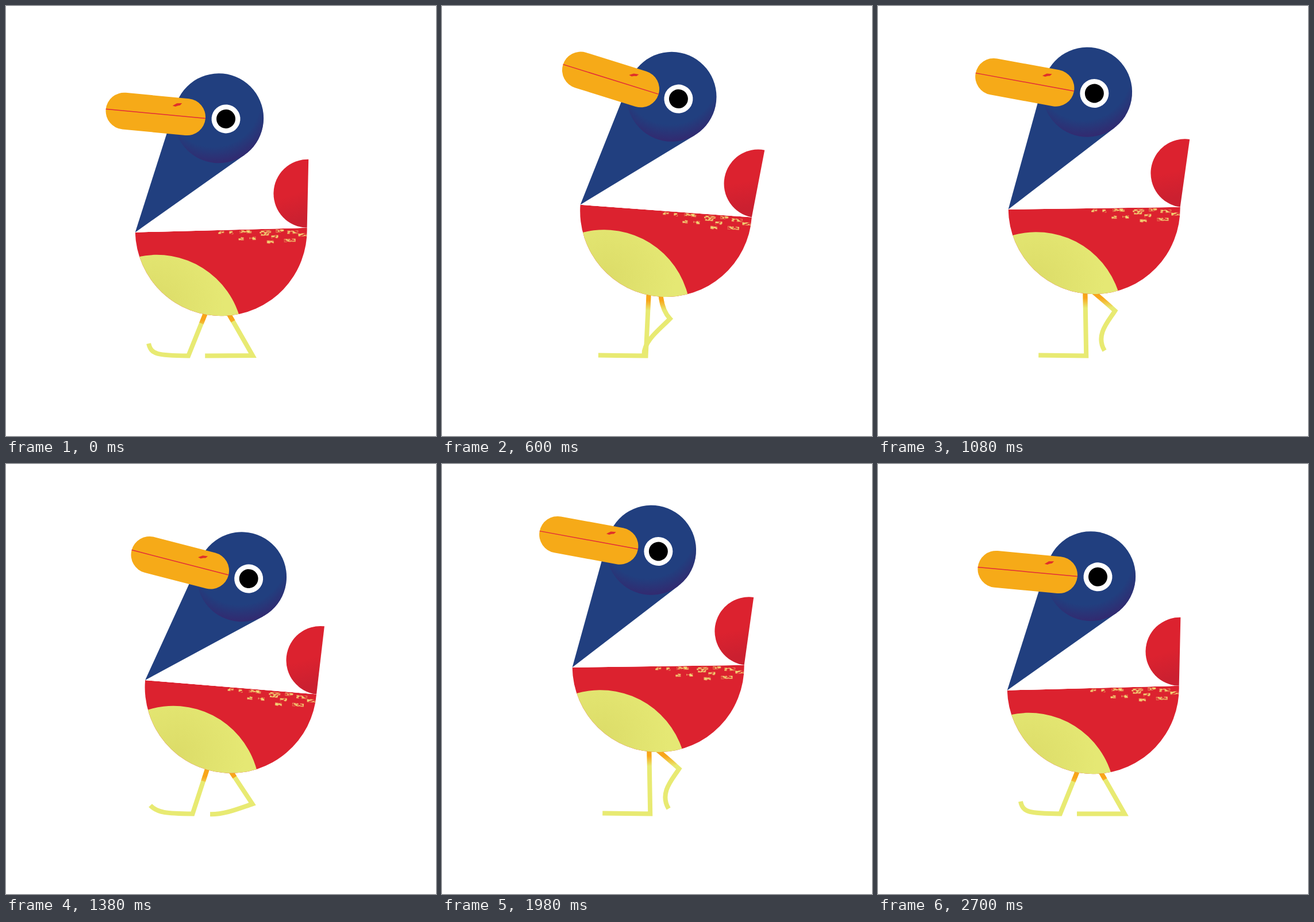
Write an HTML page without scripts that moves like this. It is 748 by 748 pixels and loops after 2730 ms.

```html
<!DOCTYPE html>
<html lang="en">
<head>
<meta charset="utf-8">
<title>Walking bird</title>
<style>
  @property --walk { syntax: "<angle>"; inherits: true; initial-value: 0deg; }

  html, body { margin: 0; width: 100%; height: 100%; overflow: hidden; background: #fff; }

  svg {
    display: block; width: 100vw; height: 100vh;
    animation: walk 2730ms linear infinite;

    --front: path("M362 497Q340 552 317 608.5C262 608 252 606 248 587");
    --flat:  path("M361 491Q350 550 339 608.5C311 608 284 608 257 607.5");
    --under: path("M360 485Q361 546 362 608.5C334 608 307 608 279 607.5");
    --late:  path("M376 488Q388 548 399 608.5C371 608 344 608 316 607.5");
    --back:  path("M365 497Q397 552 429 608.5C401 608.5 374 608.5 346 608.5");
    --lift:  path("M364 491Q397 532 428 567C406 588 390 611 368 610");
    --trail: path("M360 485Q388 508 413 530C402 548 378 572 395 600");
    --pass:  path("M380 485Q379 525 397 544C380 562 352 582 352 606");
    --reach: path("M372 497Q340 520 315 552C294 544 272 537 252 526");
  }

  /* Three full strides, then a short rest on the contact pose. */
  @keyframes walk { 98.9%, 100% { --walk: 1080deg; } }

  /* The body bounces twice per stride and sways once. */
  .bounce {
    transform: translate(378.3px, calc(526.4px + 19.3px * cos(2 * var(--walk) + 11deg * (1 - cos(2 * var(--walk))))));
  }
  .sway {
    transform: rotate(calc(1.48deg - 2.98deg * cos(var(--walk)) - 1.43deg * sin(var(--walk)))) translateY(-156px);
  }
  .belly { transform: translate(calc(-100.3px - 16.5px * cos(var(--walk)) + 2px * sin(var(--walk))), 190px); }
  .tail {
    transform: translateX(149.5px) rotate(calc(7deg - 4.2deg * cos(2 * var(--walk)) - 2.9deg * sin(2 * var(--walk))));
  }
  .neck {
    transform: translateX(-149.5px) rotate(calc(35.4deg + 2.3deg * cos(2 * var(--walk)) + 2.1deg * sin(2 * var(--walk))));
  }
  .head {
    transform: translateY(-246px) rotate(calc(-28.4deg - 2.5deg * cos(2 * var(--walk)) + 4.9deg * sin(2 * var(--walk))));
  }

  .legs { fill: none; stroke: #e8ea72; stroke-width: 8; stroke-miterlimit: 4; }
  .thighs { stroke: #f9a51a; stroke-dasharray: 60 400; }
  .near { d: var(--front); animation: near 2730ms linear infinite; }
  .far { d: var(--back); animation: far 2730ms linear infinite; }

  @keyframes near {
    0%, 32.97%, 65.93%, 98.9%, 100% { d: var(--front); }
    3.3%, 36.26%, 69.23% { d: var(--flat); }
    6.59%, 39.56%, 72.53% { d: var(--under); }
    12.09%, 45.05%, 78.02% { d: var(--late); }
    16.48%, 49.45%, 82.42% { d: var(--back); }
    19.23%, 52.2%, 85.16% { d: var(--lift); }
    21.98%, 54.95%, 87.91% { d: var(--pass); }
    28.57%, 61.54%, 94.51% { d: var(--reach); }
  }
  @keyframes far {
    0%, 32.97%, 65.93%, 98.9%, 100% { d: var(--back); }
    3.3%, 36.26%, 69.23% { d: var(--lift); }
    6.59%, 39.56%, 72.53% { d: var(--trail); }
    12.09%, 45.05%, 78.02% { d: var(--reach); }
    16.48%, 49.45%, 82.42% { d: var(--front); }
    19.78%, 52.75%, 85.71% { d: var(--flat); }
    23.08%, 56.04%, 89.01% { d: var(--under); }
    28.57%, 61.54%, 94.51% { d: var(--late); }
  }
</style>
</head>
<body>
<svg viewBox="0 0 748 748" role="img" aria-label="A colourful bird walking">
  <defs>
    <linearGradient id="fade" x2="0" y2="1">
      <stop offset=".85" stop-color="#fff"/>
      <stop offset=".95" stop-color="#000"/>
    </linearGradient>
    <mask id="hips" maskUnits="userSpaceOnUse" x="0" y="0" width="748" height="748">
      <rect class="bounce" x="-150" y="-146" width="300" height="172" fill="url(#fade)"/>
    </mask>
    <clipPath id="bowl"><path d="M-149.5 0A149.5 149.5 0 0 0 149.5 0Z"/></clipPath>
    <radialGradient id="headShade" cx=".42" cy=".3" r=".71">
      <stop offset=".74" stop-color="#322a70" stop-opacity="0"/>
      <stop offset="1" stop-color="#322a70"/>
    </radialGradient>
    <radialGradient id="bellyTone" cx=".5" cy=".28" r=".4">
      <stop offset="0" stop-color="#dcdc68"/>
      <stop offset="1" stop-color="#e5e874"/>
    </radialGradient>
    <linearGradient id="tailTone" x2=".2" y2="1">
      <stop offset=".6" stop-color="#dc222f"/>
      <stop offset="1" stop-color="#cb2030"/>
    </linearGradient>
    <filter id="grain" x="-10%" y="-50%" width="120%" height="200%" color-interpolation-filters="sRGB">
      <feTurbulence type="fractalNoise" baseFrequency=".2 .4" numOctaves="2" seed="4"/>
      <feColorMatrix values="0 0 0 0 0  0 0 0 0 0  0 0 0 0 0  7 0 0 0 -2.8"/>
      <feComposite in="SourceGraphic" operator="in"/>
    </filter>
  </defs>

  <rect width="748" height="748" fill="#fff"/>

  <g class="legs">
    <path class="near"/>
    <path class="far"/>
  </g>
  <g class="legs thighs" mask="url(#hips)">
    <path class="near"/>
    <path class="far"/>
  </g>

  <g class="bounce">
    <g class="sway">
      <path class="tail" d="M0 0A59.5 59.5 0 0 1 0-119Z" fill="url(#tailTone)"/>

      <g clip-path="url(#bowl)">
        <rect x="-150" width="300" height="150" fill="#dc222f"/>
        <circle class="belly" r="150" fill="url(#bellyTone)"/>
        <path d="M-5 4h10M14 5h7M32 4h21M30 16h9M49 16h11M67 5h20M69 9h14M95 4h14M115 7h19M134 12h15M87 14h12M109 21h20M79 23h12"
              fill="none" stroke="#f3d774" stroke-width="5" filter="url(#grain)"/>
      </g>

      <g class="neck">
        <path d="M0 0L-74-221H74Z" fill="#213f7f"/>
        <g class="head">
          <circle r="78" fill="#213f7f"/>
          <circle r="78" fill="url(#headShade)"/>
          <rect x="-197" y="-29" width="174" height="64" rx="32" fill="#f6aa18"/>
          <path d="M-197 2.5H-23" stroke="#e22a3a" stroke-width="1.5"/>
          <path d="M-82-14L-75-19-66-20-69-16-73-15-77-13Z" fill="#e0302a"/>
          <circle cx="12.5" r="25" fill="#fff"/>
          <circle cx="12.5" r="16.5"/>
        </g>
      </g>
    </g>
  </g>
</svg>
</body>
</html>
```
